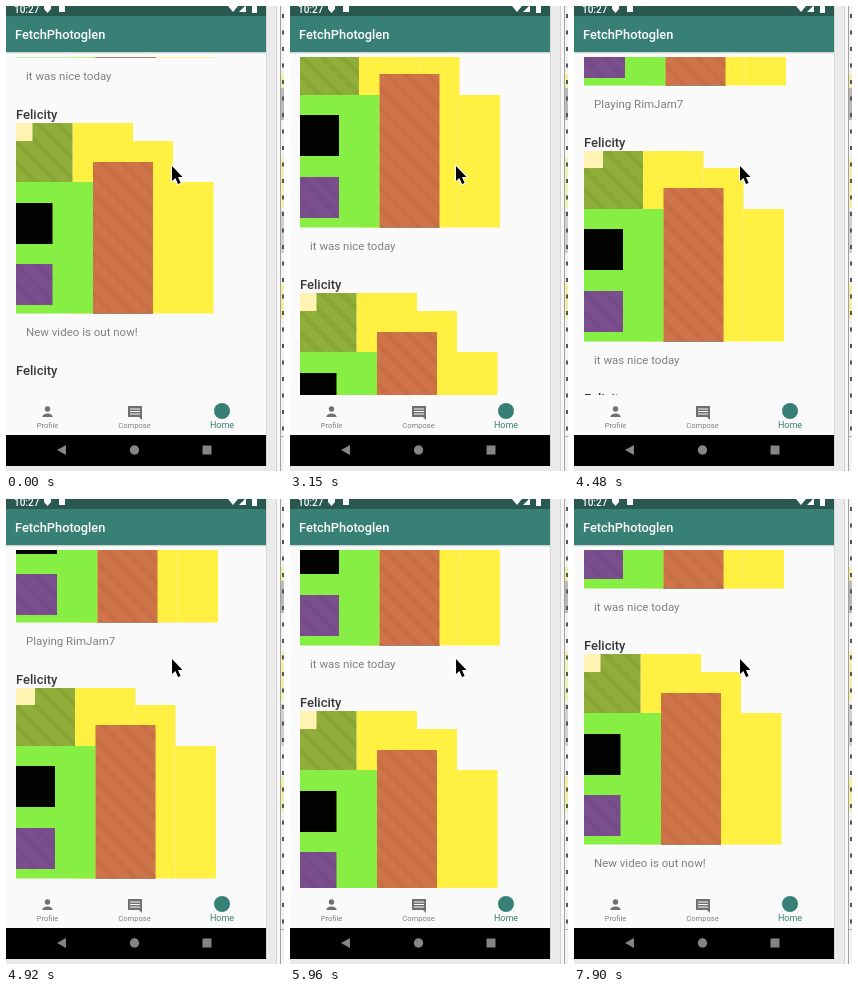
Write an HTML page with a canvas that moves like this. It is 278 by 465 pixels and loops after 8000 ms.

```html
<!DOCTYPE html>
<html lang="en">
<head>
<meta charset="utf-8">
<title>Photo feed</title>
<style>
html, body { margin: 0; width: 100%; height: 100%; overflow: hidden; background: #ececec; }
canvas { display: block; width: 278px; height: 465px; }
</style>
</head>
<body>
<canvas id="stage"></canvas>
<script>
const W = 278, H = 465, LOOP = 8000;
const canvas = document.getElementById('stage');
const ctx = canvas.getContext('2d');
const dpr = window.devicePixelRatio || 1;
canvas.width = W * dpr;
canvas.height = H * dpr;

const FONT = 'Roboto, "Noto Sans", sans-serif';
const TEAL = '#388075';
const PITCH = 256, PIC_H = 190.5;
const AUTHOR = 'Felicity';

// Row 0 is the post that the scroll position places.
const posts = [
  { row: -2, text: 'Playing RimJam7', dx: 2, dy: 2.5 },
  { row: -1, text: 'it was nice today', dx: 0, dy: 0 },
  { row: 0, text: 'New video is out now!', dx: -2.5, dy: 1.5 },
  { row: 1 }
];

// [ms, y of the row 0 picture], in hard steps
const scroll = [
  [0, 117], [150, 189], [3150, 287], [3300, 331], [3440, 371], [3590, 422],
  [3740, 424], [4340, 426], [4480, 401], [4630, 413], [4780, 420], [4920, 445],
  [5070, 424], [5370, 405.5], [5520, 290], [5670, 245], [5810, 224],
  [5960, 212], [7600, 200], [7750, 158], [7900, 155]
];

function box(x, y, w, h, fill) {
  ctx.fillStyle = fill;
  ctx.fillRect(x, y, w, h);
}

function text(str, x, y, size, fill, weight = 400, align = 'left') {
  ctx.font = `${weight} ${size}px ${FONT}`;
  ctx.textAlign = align;
  ctx.fillStyle = fill;
  ctx.fillText(str, x, y);
}

function path(points, fill) {
  ctx.beginPath();
  points.forEach(([x, y]) => ctx.lineTo(x, y));
  ctx.closePath();
  if (fill) {
    ctx.fillStyle = fill;
    ctx.fill();
  }
}

function disc(x, y, r, fill) {
  ctx.beginPath();
  ctx.arc(x, y, r, 0, Math.PI * 2);
  ctx.fillStyle = fill;
  ctx.fill();
}

// Faint diagonal bands inside a block
function hatch(x, y, w, h, tone) {
  ctx.save();
  ctx.beginPath();
  ctx.rect(x, y, w, h);
  ctx.clip();
  ctx.strokeStyle = tone;
  ctx.lineWidth = 5;
  for (let k = -h; k < w; k += 20) {
    ctx.beginPath();
    ctx.moveTo(x + k - 5, y - 5);
    ctx.lineTo(x + k + h + 5, y + h + 5);
    ctx.stroke();
  }
  ctx.restore();
}

function picture(top, dx, dy) {
  // Blocks lie on a square grid; index -1 is the left or top edge.
  const gx = c => c < 0 ? 10 : Math.round((29 + 20.1 * c + dx) * 2) / 2;
  const gy = r => r < 0 ? top : Math.min(top + PIC_H, top + Math.round(16.5 + 20.5 * r + dy));
  const block = (c0, r0, c1, r1, fill, bands) => {
    const x = gx(c0), y = gy(r0), w = gx(c1) - x, h = gy(r1) - y;
    box(x, y, w, h, fill);
    if (bands) hatch(x, y, w, h, bands);
  };
  block(2, -1, 5, 9, '#fff042');
  block(5, 0, 7, 9, '#fff042');
  block(7, 2, 9, 9, '#fff042');
  block(-1, -1, 2, 2, '#90ae3a', 'rgba(70,100,20,.1)');
  block(-1, -1, 0, 0, '#fff2b2');
  block(-1, 2, 3, 9, '#87ee44');
  block(3, 1, 6, 9, '#cf7448', 'rgba(140,60,40,.1)');
  block(-1, 3, 1, 5, '#020200');
  block(-1, 6, 1, 8, '#7b4f8e', 'rgba(60,30,90,.08)');
  box(gx(3), top + PIC_H, gx(6) - gx(3), 0.5, '#66506a');
}

function feed(y) {
  ctx.save();
  ctx.beginPath();
  ctx.rect(0, 51, 260, 338);
  ctx.clip();
  for (const p of posts) {
    const top = y + p.row * PITCH;
    text(AUTHOR, 10, top - 4, 13, '#383838', 500);
    if (!p.text) continue;
    picture(top, p.dx, p.dy);
    text(p.text, 20, top + 213, 11.5, '#808080');
  }
  ctx.restore();
}

function header() {
  box(0, 0, 260, 10, '#28584f');
  box(0, 10, 260, 36, TEAL);
  box(0, 46, 260, 1, '#c9d3d1');
  box(0, 47, 260, 1, '#eef0f0');
  text('10:27', 8, 7, 10, '#fff', 500);
  path([[38, 0], [45, 0], [45, 3], [41.5, 7], [38, 3]], '#fff');
  box(53, 0, 6, 6, '#fff');
  path([[222, 0], [232, 0], [227, 6]], '#fff');
  path([[233, 6], [240, 6], [240, 0], [239, 0]], '#fff');
  box(246, 0, 5, 7, '#fff');
  text('FetchPhotoglen', 9, 33, 12.8, '#fff', 500);
}

function tabs() {
  const grey = '#707070';
  disc(41.5, 403, 2.7, grey);
  ctx.beginPath();
  ctx.ellipse(41.5, 411, 5.2, 3.6, 0, Math.PI, 0);
  ctx.fill();
  path([[122, 400], [136, 400], [136, 414], [133, 411], [122, 411]], grey);
  [402.5, 405, 407.5].forEach(y => box(124, y, 10, 1, '#fafafa'));
  disc(216, 405, 8, TEAL);
  text('Profile', 41.5, 422, 7.6, '#808080', 400, 'center');
  text('Compose', 128.5, 422, 7.6, '#808080', 400, 'center');
  text('Home', 216, 422, 9, TEAL, 400, 'center');

  box(0, 429, 260, 31, '#000');
  path([[51, 444], [60, 439], [60, 449]], '#858585');
  disc(128.5, 444, 4.7, '#858585');
  box(196.5, 439.5, 9, 9, '#858585');
}

// Sliver of the desktop beside the phone
function desktop() {
  box(260, 0, 18, H, '#ebebeb');
  box(260, 0, 1, 460, '#d8d8d8');
  box(0, 460, 270, 5, '#e9e9e9');
  box(270, 0, 1, H, '#d2d2d2');
  box(271, 0, 3, H, '#f7f7f7');
  box(274, 0, 1, H, '#a2a2a2');
  box(275, 0, 3, H, '#f3f3f3');
  box(275, 68, 3, 14, '#f3efa0');
  box(275, 82, 3, 32, '#b9b9b9');
  box(275, 152, 3, 50, '#f3efb0');
  box(275, 205, 3, 42, '#d0d0d0');
  box(275, 278, 3, 34, '#f3efa0');
  for (let y = 8; y < 425; y += 16.5) box(276, y, 2, 4, '#555');
  box(275, 430, 3, 1, '#aaa');
}

function pointer() {
  path([[166, 160], [166, 175], [169.4, 172], [172, 178], [174.6, 177], [172, 171], [176.5, 171]]);
  ctx.lineJoin = 'round';
  ctx.lineWidth = 2;
  ctx.strokeStyle = '#fff';
  ctx.stroke();
  ctx.fillStyle = '#000';
  ctx.fill();
}

function draw(now) {
  const t = now % LOOP;
  let top = scroll[0][1];
  for (const [at, y] of scroll) if (t >= at) top = y;

  ctx.setTransform(dpr, 0, 0, dpr, 0, 0);
  box(0, 0, W, H, '#fafafa');
  feed(top);
  header();
  tabs();
  desktop();
  pointer();
}

const start = performance.now();
function tick() {
  draw(performance.now() - start);
  requestAnimationFrame(tick);
}
tick();
</script>
</body>
</html>
```
